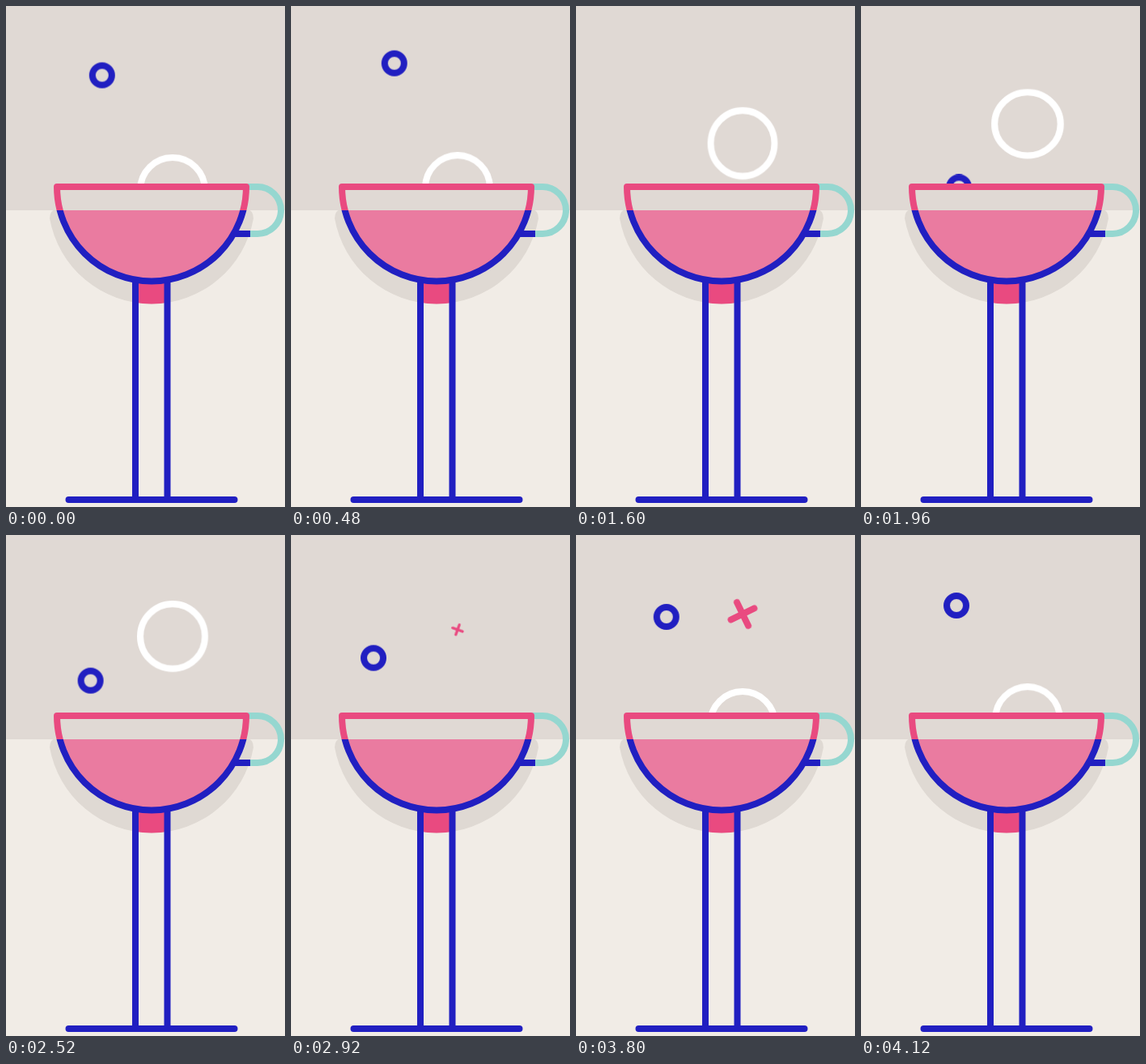
Write an HTML page without scripts that moves like this. It is 345x618 px and loops after 4160 ms.

```html
<!DOCTYPE html>
<html lang="en">
<head>
<meta charset="utf-8">
<title>Fizzy cup</title>
<style>
  :root {
    --wall: #e0d9d4;
    --table: #f1ece6;
    --shade: #dfd9d3;
    --blue: #211fc1;
    --pink: #e94a80;
    --rose: #ea7ba0;
    --mint: #95d7d0;
  }
  html, body { margin: 0; width: 100%; height: 100%; overflow: hidden; background: var(--table); }
  svg { display: block; width: 100%; height: 100%; }
  .line { fill: none; stroke-width: 8; stroke-linecap: round; stroke-linejoin: round; }
  .blue { stroke: var(--blue); }
  .pink { stroke: var(--pink); }
  .mint { stroke: var(--mint); stroke-linecap: butt; }
  .white { stroke: #fff; }

  .move { animation: 4160ms linear infinite; transform-origin: 0 0; }
  .small { animation-delay: -2400ms; }
  .big { animation-delay: -880ms; }

  /* small bubble: rises while swaying, then pops */
  .small.rise { animation-name: small-rise; }
  @keyframes small-rise {
    0% { transform: translateY(240.5px); animation-timing-function: cubic-bezier(.333, .39, .667, .728); }
    35.58% { transform: translateY(131.5px); animation-timing-function: cubic-bezier(.333, .473, .667, .843); }
    71.15%, 100% { transform: translateY(69px); }
  }
  .small.sway { animation-name: small-sway; }
  @keyframes small-sway {
    0% { transform: translateX(132px); animation-timing-function: cubic-bezier(.333, .8, .667, 1); }
    27.88% { transform: translateX(102px); animation-timing-function: cubic-bezier(.333, 0, .667, .667); }
    71.15%, 100% { transform: translateX(129px); }
  }
  .small.pop { animation-name: small-pop; }
  @keyframes small-pop {
    0%, 71.15% { transform: scale(1); }
    73.08%, 100% { transform: scale(0); }
  }

  /* big bubble: lingers at the rim, leaps, wobbles, pops */
  .big.rise { animation-name: big-rise; }
  @keyframes big-rise {
    0% { transform: translateY(268px); animation-timing-function: cubic-bezier(.333, .52, .667, .85); }
    12.5% { transform: translateY(233px); animation-timing-function: cubic-bezier(.333, .48, .667, .82); }
    20.19% { transform: translateY(227.2px); animation-timing-function: cubic-bezier(.333, .6, .667, .83); }
    34.62% { transform: translateY(224px); }
    50% { transform: translateY(222.5px); animation-timing-function: cubic-bezier(.333, 0, .667, .787); }
    59.62% { transform: translateY(169.5px); animation-timing-function: cubic-bezier(.333, .42, .667, .74); }
    68.27% { transform: translateY(145.5px); animation-timing-function: cubic-bezier(.333, .47, .667, .75); }
    81.73% { transform: translateY(125px); }
    89.42%, 100% { transform: translateY(117.5px); }
  }
  .big.pop { animation-name: big-pop; }
  @keyframes big-pop {
    0%, 50% { transform: scale(1); animation-timing-function: ease-in-out; }
    59.62% { transform: scale(.985, 1.015); animation-timing-function: ease-in-out; }
    68.27% { transform: scale(1.02, .977); animation-timing-function: ease-in-out; }
    77%, 88.46% { transform: scale(1); }
    90.38%, 100% { transform: scale(0); }
  }

  /* cross left behind by the big bubble */
  .cross.rise { animation-name: cross-rise; }
  @keyframes cross-rise {
    0%, 68.27% { transform: translateY(118.5px); }
    77.88% { transform: translateY(110px); }
    91.35% { transform: translateY(97.5px); }
    100% { transform: translateY(90px); }
  }
  .cross.spin { animation-name: cross-spin; }
  @keyframes cross-spin {
    0%, 68.27% { transform: rotate(16deg); }
    100% { transform: rotate(82deg); }
  }
  .cross.pop { animation-name: cross-pop; }
  @keyframes cross-pop {
    0%, 68.27% { transform: scale(0); animation-timing-function: cubic-bezier(.2, .6, .5, 1); }
    77.88% { transform: scale(.87); animation-timing-function: ease-out; }
    88%, 94.2% { transform: scale(1); }
    96.2%, 100% { transform: scale(0); }
  }
</style>
</head>
<body>
<svg viewBox="0 0 345 618" preserveAspectRatio="none">
  <defs>
    <path id="bowl" d="M63 223H297A117 116.5 0 0 1 63 223Z"/>
    <path id="shadow" d="M62 251H298Q306 252 306 262A128 128 0 0 1 54 262Q54 252 62 251Z"/>
    <clipPath id="aboveRim"><rect width="345" height="219"/></clipPath>
    <clipPath id="upper"><rect width="345" height="252"/></clipPath>
    <clipPath id="lower"><rect y="252" width="345" height="366"/></clipPath>
    <clipPath id="inShadow"><use href="#shadow"/></clipPath>
  </defs>

  <rect width="345" height="618" fill="var(--table)"/>
  <use href="#shadow" fill="var(--shade)"/>
  <rect width="345" height="252" fill="var(--wall)"/>

  <g clip-path="url(#aboveRim)">
    <g transform="translate(206 0)">
      <g class="move big rise">
        <circle class="move big pop line white" r="40"/>
      </g>
      <g class="move cross rise"><g class="move cross spin">
        <path class="move cross pop line pink" d="M-16 0H16M0-16V16"/>
      </g></g>
    </g>
    <g class="move small rise"><g class="move small sway">
      <circle class="move small pop line blue" r="12"/>
    </g></g>
  </g>

  <rect x="160" y="335" width="40" height="40" fill="var(--pink)" clip-path="url(#inShadow)"/>
  <path class="line blue" d="M160 340V608M199.5 340V608M77.5 609H282.5"/>

  <path class="line mint" d="M299 223H311A29 29 0 0 1 311 281H302"/>
  <path class="line blue" style="stroke-linecap:butt" d="M282 281H302"/>

  <g clip-path="url(#lower)">
    <use href="#bowl" class="line blue" style="fill:var(--rose)"/>
  </g>
  <g clip-path="url(#upper)">
    <use href="#bowl" class="line pink" style="fill:var(--wall)"/>
  </g>
</svg>
</body>
</html>
```
